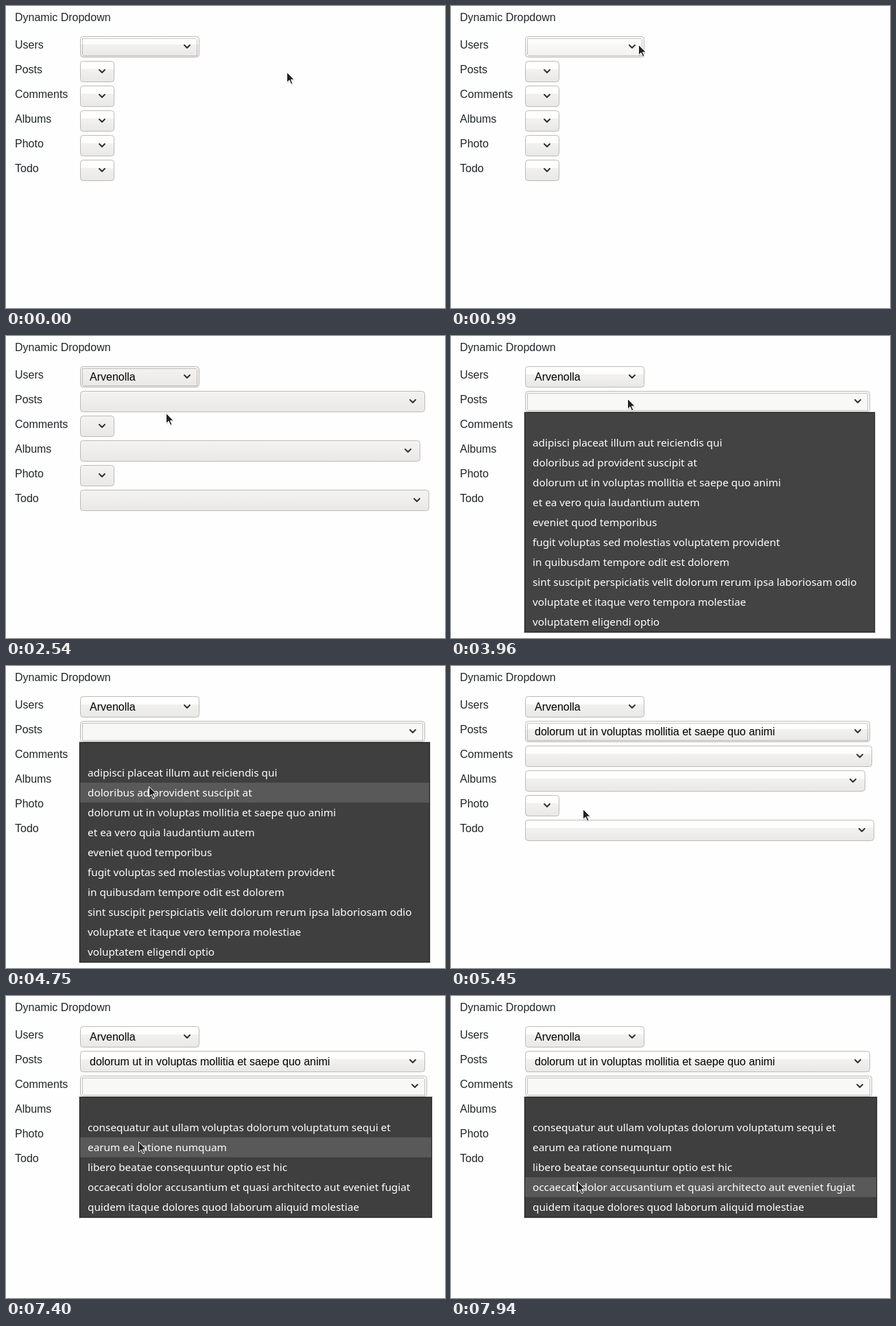
These frames come from a looping animation (640 px wide and 440 px high, 8000 ms). An HTML page:

```html
<!DOCTYPE html>
<html lang="en">
<head>
<meta charset="utf-8">
<title>Dynamic Dropdown</title>
<style>
html, body { margin: 0; width: 100%; height: 100%; overflow: hidden; background: #fefefe; }
svg { display: block; width: 640px; height: 440px; }
.label { font: 16px/17px "Liberation Sans", Arial, sans-serif; white-space: pre; }
.item { fill: #fff; font: 15.3px "Noto Sans", "Open Sans", sans-serif; }
.chevron { fill: none; stroke: #2e3436; stroke-width: 2; stroke-linecap: round; stroke-linejoin: round; }
.focus { fill: none; stroke: #8f8d89; stroke-dasharray: 1 1; }
</style>
</head>
<body>
<svg viewBox="0 0 640 440">
  <defs>
    <linearGradient id="glossy" x2="0" y2="1">
      <stop stop-color="#fff"/><stop offset=".36" stop-color="#fdfdfd"/>
      <stop offset=".4" stop-color="#f1f1ef"/><stop offset="1" stop-color="#e9e8e6"/>
    </linearGradient>
    <linearGradient id="flat" x2="0" y2="1">
      <stop stop-color="#f4f3f2"/><stop offset="1" stop-color="#eae8e6"/>
    </linearGradient>
    <linearGradient id="hover" x2="0" y2="1">
      <stop stop-color="#fff"/><stop offset="1" stop-color="#f1f0ee"/>
    </linearGradient>
  </defs>
  <g id="scene"></g>
</svg>
<script>
const LOOP = 8000, ROW = 29;
const scene = document.getElementById('scene');
const labels = ['Users', 'Posts', 'Comments', 'Albums', 'Photo', 'Todo'];

// open: menu appears, ready: first row lights up, pressedUntil: button held down
const menus = [
  { open: 1260, ready: 1410, pressedUntil: 1410, close: 2540, width: 173, pick: 1, items: [
    'Arvenolla', 'Bosk', 'Dorvanna', 'Emrid.Tovask', 'Kolvun', 'Kestolla',
    'Lundavro_Pelgast', 'Mistor_Vadune', 'Mulden.Kroavik', 'Sundreva'] },
  { open: 3960, ready: 4210, pressedUntil: 0, close: 5450, width: 511, pick: 3, items: [
    'adipisci placeat illum aut reiciendis qui',
    'doloribus ad provident suscipit at',
    'dolorum ut in voluptas mollitia et saepe quo animi',
    'et ea vero quia laudantium autem',
    'eveniet quod temporibus',
    'fugit voluptas sed molestias voluptatem provident',
    'in quibusdam tempore odit est dolorem',
    'sint suscipit perspiciatis velit dolorum rerum ipsa laboriosam odio',
    'voluptate et itaque vero tempora molestiae',
    'voluptatem eligendi optio'] },
  { open: 6690, ready: 6830, pressedUntil: 6830, close: 9000, width: 514, pick: 0, items: [
    'consequatur aut ullam voluptas dolorum voluptatum sequi et',
    'earum ea ratione numquam',
    'libero beatae consequuntur optio est hic',
    'occaecati dolor accusantium et quasi architecto aut eveniet fugiat',
    'quidem itaque dolores quod laborum aliquid molestiae'] }
];

// first step time, last step time, number of steps, end point
const moves = [
  [290, 990, 6, 273, 56], [1690, 1690, 1, 267, 57], [1840, 2240, 4, 233, 112],
  [3250, 3370, 2, 257, 91], [4210, 4900, 6, 191, 205], [5030, 5030, 1, 192, 208],
  [6010, 6410, 4, 213, 128], [6970, 7640, 6, 186, 241], [7790, 7790, 1, 185, 257],
  [7940, 7940, 1, 184, 270]
];

function pointer(t) {
  let x = 409, y = 96;
  for (const [start, end, steps, toX, toY] of moves) {
    if (t < start) break;
    const gap = (end - start) / (steps - 1) || 1;
    const done = Math.min(steps, Math.floor((t - start) / gap + 1.01)) / steps;
    const k = done * done * (3 - 2 * done);
    x += (toX - x) * k;
    y += (toY - y) * k;
  }
  return [Math.round(x), Math.round(y)];
}

// HTML text keeps whole-pixel glyph spacing; y is the baseline
const label = (x, y, s, color = '#212529') =>
  `<foreignObject x="${x}" y="${y - 14}" width="480" height="20">` +
  `<div class="label" style="color:${color}">${s}</div></foreignObject>`;
const rect = (x, y, w, h, fill, more = '') =>
  `<rect x="${x}" y="${y}" width="${w}" height="${h}" fill="${fill}" ${more}/>`;

function widths(t) {
  const user = t >= 2540;
  return [174, user ? 503 : 50, t >= 5450 ? 506 : 50, user ? 496 : 50, 50, user ? 509 : 50];
}

function select(i, w, t) {
  const y = 44 + 36 * i, menu = menus[i], cx = 108 + w - 18;
  let fill = t >= 2540 && t < 3960 ? 'url(#flat)' : 'url(#glossy)';
  if (i === 0 && t >= 850 && t < 1260) fill = 'url(#hover)';
  if (menu && t >= menu.open && t < menu.close) fill = t < menu.pressedUntil ? '#d5d2cd' : '#f8f8f6';
  const focused = i === (t < 3960 ? 0 : t < 6690 ? 1 : 2);
  return rect(108.5, y + .5, w - 1, 30, fill, 'rx="4" stroke="#bdbab5"') +
    (focused ? `<path class="focus" d="M112 ${y + 3.5}h${w - 8}m0 25h${8 - w}M111.5 ${y + 4}v24m${w - 7} 0v-24"/>` : '') +
    `<path class="chevron" d="M${cx - 4} ${y + 13}l4 4l4-4"/>` +
    (menu && menu.pick && t >= menu.close ? label(122, y + 21, menu.items[menu.pick - 1], '#000') : '');
}

function popup(i, t, mouseY) {
  const { open, ready, close, width, items } = menus[i];
  if (t < open || t >= close) return '';
  const y = 75 + 36 * i, h = (items.length + 1) * ROW;
  const row = Math.max(0, Math.floor((mouseY - y - 1) / ROW));
  return rect(106, y - 1, width + 2, h + 4, '#000', 'opacity=".2"') +
    rect(107.5, y + .5, width - 1, h + 1, t < ready ? '#434343' : '#3f3f3f', 'stroke="#202020"') +
    (t >= ready ? rect(108, y + 1 + row * ROW, width - 2, ROW, '#595959') : '') +
    items.map((s, n) => `<text class="item" x="119" y="${y + 50 + n * ROW}">${s}</text>`).join('');
}

function cursor(x, y) {
  const shape = 'M0 0V15L3.6 11.6L6 17.3L8.4 16.3L6 10.8H10.6Z';
  return `<path d="${shape}" transform="translate(${x + 1} ${y + 2})" opacity=".18"/>` +
    `<path d="${shape}" transform="translate(${x + .5} ${y + .5})" fill="#222" stroke="#fff"/>`;
}

let last = '';
function draw(now) {
  const t = now % LOOP, [x, y] = pointer(t), w = widths(t);
  const html = label(13, 22, 'Dynamic Dropdown') +
    labels.map((s, i) => label(13, 62 + 36 * i, s) + select(i, w[i], t)).join('') +
    menus.map((m, i) => popup(i, t, y)).join('') + cursor(x, y);
  if (html !== last) scene.innerHTML = last = html;
}

let began;
function tick(now) {
  began ??= now;
  draw(now - began);
  requestAnimationFrame(tick);
}
draw(0);
requestAnimationFrame(tick);
</script>
</body>
</html>
```
